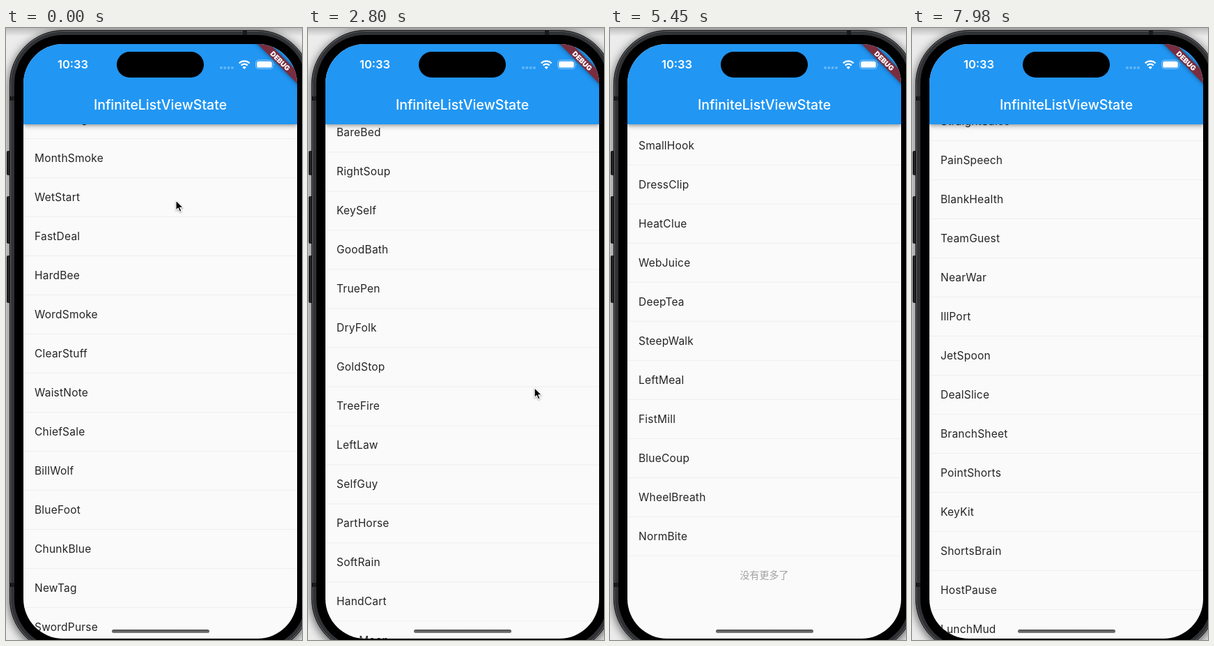
These frames come from a looping animation (425 by 877 pixels, 8000 ms). An HTML page:

```html
<!DOCTYPE html>
<html lang="en">
<head>
<meta charset="utf-8">
<title>Infinite list</title>
<style>
html, body { margin: 0; width: 100%; height: 100%; overflow: hidden; }
body { position: relative; background: linear-gradient(#bdbdbd, #ececec 12px); font-family: Inter, Roboto, sans-serif; }
div, svg { position: absolute; box-sizing: border-box; }
.frame { left: 5px; top: 3px; width: 433px; height: 892px; border-radius: 77px; background: #303235;
  border: 1px solid #0b0b0b; box-shadow: inset 0 0 0 1px #64666a, 0 3px 13px 1px rgba(0,0,0,.6); }
.bezel { left: 12px; top: 10px; width: 419px; height: 878px; border-radius: 70px; background: #000; }
.button { left: 1px; width: 6px; height: 68px; background: linear-gradient(90deg, #111, #3a3a3a 50%, #1a1a1a); border-radius: 2px 0 0 2px; }
.mark { width: 6px; height: 6px; background: #191a1b; }
.screen { left: 25px; top: 23px; width: 393px; height: 852px; border-radius: 57px; overflow: hidden; background: #fafafa; }
/* Children of the stage layer use stage coordinates. */
.stage { left: -25px; top: -23px; width: 425px; height: 877px; }
.list { left: 25px; top: 0; width: 393px; }
.rows { position: relative; overflow: hidden; }
.row { position: relative; height: 56px; padding-left: 16px; line-height: 56px; font-size: 15.5px; letter-spacing: .22px;
  color: #252525; border-bottom: 1px solid #eee; white-space: nowrap; }
.footer { position: relative; height: 52px; line-height: 52px; text-align: center; font-size: 14px; color: #a2a2a2;
  font-family: "Noto Sans CJK SC", "Noto Sans CJK", sans-serif; }
.header { left: 25px; top: 23px; width: 393px; height: 115px; background: #2196f3; color: #fff;
  box-shadow: 0 2px 4px -1px rgba(0,0,0,.2), 0 4px 5px rgba(0,0,0,.14), 0 1px 10px rgba(0,0,0,.12); }
.title { width: 100%; top: 75px; line-height: 24px; text-align: center; font-size: 19.5px; font-weight: 500; }
.clock { left: 49px; top: 19px; line-height: 20px; font-size: 16.5px; font-weight: 600; }
.island { left: 159px; top: 34px; width: 125px; height: 37px; border-radius: 19px; background: #000; }
.banner { left: 344px; top: 41px; width: 100px; height: 12px; transform: rotate(45deg); background: rgb(121,45,63);
  box-shadow: 0 0 6px rgba(0,0,0,.5); color: #fff; font-size: 10px; line-height: 12px; font-weight: 900; text-align: center; }
.home { left: 152px; top: 862px; width: 140px; height: 5px; border-radius: 3px; background: linear-gradient(#4c4c4c, #7c7c7c); }
.overlay { left: 0; top: 0; }
</style>
</head>
<body>
<div class="button" style="top:176px;height:35px"></div>
<div class="button" style="top:241px"></div>
<div class="button" style="top:326px"></div>
<div class="frame"></div>
<div class="mark" style="left:6px;top:98px"></div>
<div class="mark" style="left:6px;top:795px"></div>
<div class="mark" style="left:340px;top:4px"></div>
<div class="bezel"></div>
<div class="screen">
  <div class="stage">
    <div class="list" id="list">
      <div class="rows" id="rows"></div>
      <div class="footer" lang="zh-CN">没有更多了</div>
    </div>
    <div class="header">
      <div class="clock">10:33</div>
      <div class="title">InfiniteListViewState</div>
    </div>
    <div class="island"></div>
    <svg class="overlay" width="425" height="80" fill="none">
      <path d="M309 57H326" stroke="#fff" stroke-opacity=".3" stroke-width="4" stroke-linecap="round" stroke-dasharray="0 5.33"/>
      <path d="M334.8 50.5a10.6 10.6 0 0 1 14.9 0M337.7 53.6a6.4 6.4 0 0 1 9.1 0" stroke="#fff" stroke-width="2.3"/>
      <path d="M342.2 59l-2.7-2.8a3.9 3.9 0 0 1 5.4 0z" fill="#fff"/>
      <rect x="358.5" y="46" width="25" height="12.5" rx="4" stroke="#fff" stroke-opacity=".45"/>
      <rect x="360.2" y="47.7" width="21.6" height="9.1" rx="2.6" fill="#fff"/>
      <path d="M385.2 50.3q1.8 2 0 4z" fill="#fff" fill-opacity=".5"/>
    </svg>
    <div class="banner">DEBUG</div>
    <div class="home"></div>
  </div>
</div>
<svg class="overlay" id="cursor" width="14" height="20" style="overflow:visible">
  <path d="M0 0V14.2L3.2 11.2L5.5 16.4L8 15.3L5.7 10.2H10.2Z" stroke="#fff" stroke-width="1.1" stroke-linejoin="round"
    style="filter:drop-shadow(0 1px 1px rgba(0,0,0,.35))"/>
</svg>
<script>
const LOOP = 8000, TICK = 147.6, TICK_LEAD = 15;
const ROW = 56, LIST_TOP = 103, FIRST_ROWS = 31, PAGE_ROWS = 20;
const FIRST_END = 1016, SETTLE = .75;

const words = `CleanRing MonthSmoke WetStart FastDeal HardBee WordSmoke ClearStuff WaistNote ChiefSale BillWolf
BlueFoot ChunkBlue NewTag SwordPurse PlainRoof WarmDesk RoughSand LateTrain FlatStone CoolLamp
LinkPatch StillEnd ThickClue BrownOak JustAct SkyZone KindGirl PieBuck ShortBus DriedPrice PopNeed
FreshLeaf BoldMove NutShell GreyCoat SafeRoad TallGate RawFish MainDoor
DueThigh BareBed RightSoup KeySelf GoodBath TruePen DryFolk GoldStop TreeFire LeftLaw SelfGuy PartHorse
SoftRain HandCart PaleMoon DarkWood FarmYard ThinRope WideLake RedBrick LongWing
SmallHook DressClip HeatClue WebJuice DeepTea SteepWalk LeftMeal FistMill BlueCoup WheelBreath NormBite
MassGroup SickSport CatFee CoastAge SongQuote ClockBreast BlueMud ShrimpEase
WholeFarm LoudBell RareCoin CalmSea SharpNail PinkRose FineLine BigTrail OldBridge MildSpice QuickStep FullMug SlimBelt RoundTop
StraightSales PainSpeech BlankHealth TeamGuest NearWar IllPort JetSpoon DealSlice BranchSheet PointShorts KeyKit
ShortsBrain HostPause LunchMud GrandHall SweetCorn WildGoat FairPlay`.split(/\s+/);

// Each swipe scrolls to an offset, then settles at its page end; start, peak and held are in ticks.
const swipes = [
  { start: 0, peak: 6, to: 1103, held: 3, down: { x: 244, y: 247 }, up: { x: 319, y: 111 } },
  { start: 10, peak: 14, to: 2129, held: 3, down: { x: 385, y: 860 }, up: { x: 330, y: 124 } },
  { start: 18, peak: 24, to: 3304.5, held: 6, down: { x: 322, y: 600 }, up: { x: 341, y: 93 } },
  { start: 26, peak: 32, to: 3535, held: 6, down: { x: 330, y: 640 }, up: { x: 276, y: 126 } },
  { start: 40, peak: 45, to: 4372, held: 1, down: { x: 279, y: 560 }, up: { x: 327, y: 72 } },
  { start: 49, peak: 54, to: 5205, held: 3, down: { x: 322, y: 620 }, up: { x: 327, y: 138 } }
];

const $ = id => document.getElementById(id);
const list = $('list'), rows = $('rows'), cursor = $('cursor');
for (const word of words) {
  const row = document.createElement('div');
  row.className = 'row';
  row.textContent = word;
  rows.append(row);
}

const mix = (a, b, u) => a + (b - a) * u;
const smooth = u => u * u * (3 - 2 * u);
const pageOf = swipe => Math.round((swipe.to - FIRST_END) / (PAGE_ROWS * ROW));

function offsetAt(tick, swipe) {
  if (tick > swipe.peak) {
    const end = FIRST_END + pageOf(swipe) * PAGE_ROWS * ROW;
    return mix(end, swipe.to, SETTLE ** (tick - swipe.peak));
  }
  const u = (tick - swipe.start) / (swipe.peak - swipe.start);
  return mix(swipe.from, swipe.to, smooth(u));
}

swipes.forEach((swipe, i) => {
  swipe.from = i ? offsetAt(swipe.start, swipes[i - 1]) : 0;
});

function draw(ms) {
  const tick = Math.floor((ms + TICK_LEAD) / TICK);
  const swipe = swipes.filter(s => s.start <= tick).pop();
  rows.style.height = (FIRST_ROWS + pageOf(swipe) * PAGE_ROWS) * ROW + 'px';
  list.style.transform = `translateY(${LIST_TOP - offsetAt(tick, swipe)}px)`;

  const { down, up, held, start } = swipe;
  const u = (tick - start) / held;
  cursor.style.display = u <= 1 ? 'block' : 'none';
  cursor.style.transform = `translate(${mix(down.x, up.x, u)}px, ${mix(down.y, up.y, u)}px)`;
}

const begun = performance.now();
function loop() {
  draw((performance.now() - begun) % LOOP);
  requestAnimationFrame(loop);
}
loop();
</script>
</body>
</html>
```
